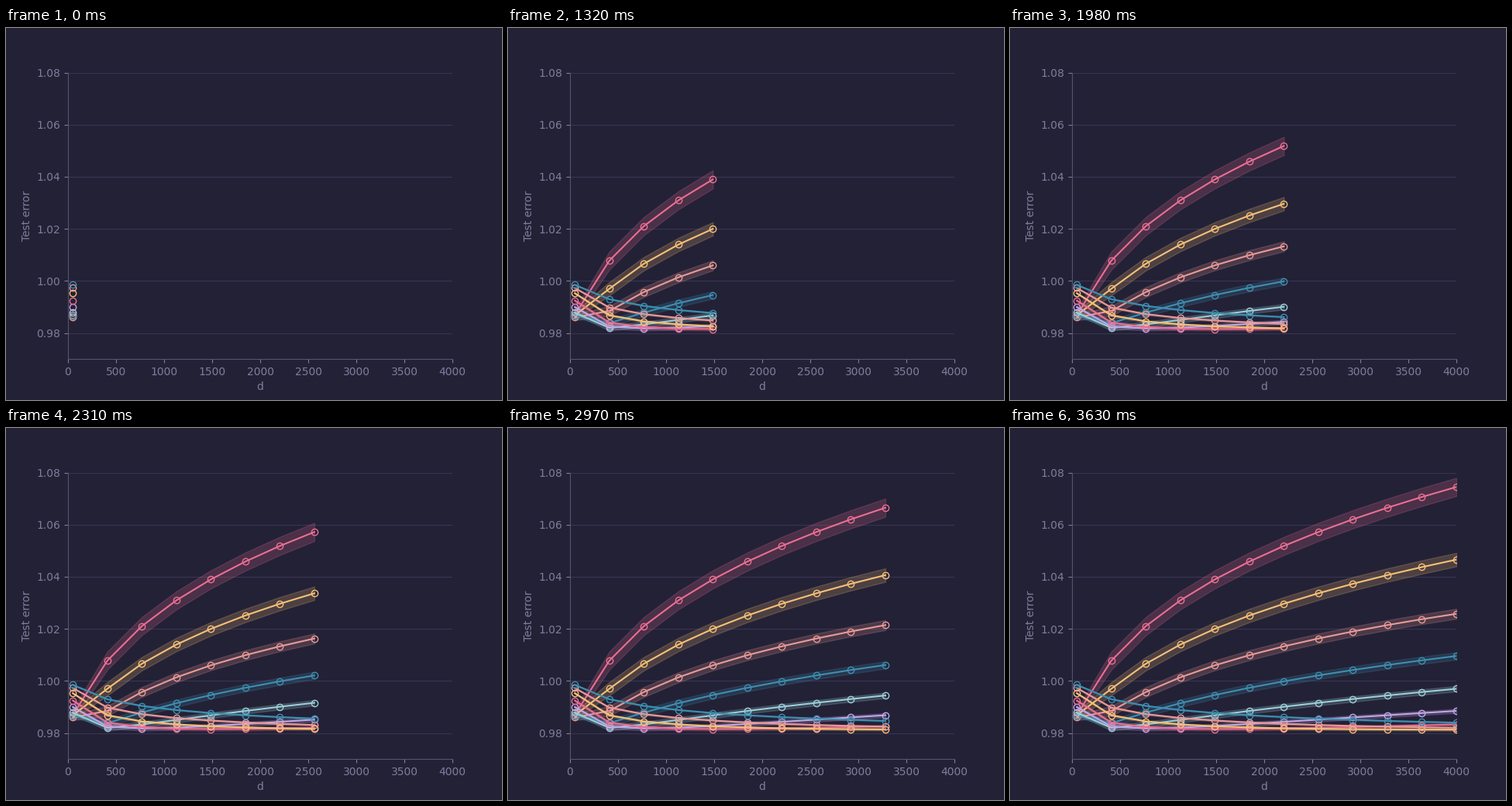
Write a matplotlib script that moves like this. It is 640 px wide and 480 px high and loops after 6960 ms.

```python
import numpy as np
import matplotlib.pyplot as plt
from matplotlib.animation import FuncAnimation

BASE, GRID, EDGE, TEXT = "#232136", "#393552", "#59546d", "#817c9c"
LOVE, GOLD, ROSE = "#eb6f92", "#f6c177", "#ea9a97"
PINE, FOAM, IRIS = "#3e8fb0", "#9ccfd8", "#c4a7e7"
PALETTE = [LOVE, GOLD, ROSE, PINE, FOAM, IRIS]

STEP_MS, LOOP_MS, TICK_MS = 330, 6960, 30
dims = np.linspace(50, 4000, 12)

# Each curve is a cubic in log(d) through four knots (1e-4 around 1)
knots = np.log(dims[[0, 1, 4, 11]])
MODELS = [
    (-130, 78, 390, 745), (-132, -30, 200, 466), (-140, -115, 60, 258),
    (-132, -162, -54, 96), (-122, -180, -132, -30), (-100, -175, -173, -115),
    (-75, -160, -185, -167), (-47, -132, -174, -187),
    (-27, -102, -152, -180), (-15, -70, -123, -160),
]


def curve(values):
    return 1 + 1e-4 * np.polyval(np.polyfit(knots, values, 3), np.log(dims))


def spread(i):
    """Half-width of the band: shrinks per model, narrow at small d."""
    return 35e-4 * 0.74 ** i * (1 - np.exp(-dims / 60))


def style_axes(ax):
    ax.set_facecolor(BASE)
    ax.set(xlim=(0, 4000), ylim=(0.97, 1.08))
    ax.set_xlabel("d", color=TEXT)
    ax.set_ylabel("Test error", color=TEXT)
    ax.set_xticks(range(0, 4001, 500))
    ax.set_yticks(np.arange(0.98, 1.081, 0.02))
    ax.yaxis.set_major_formatter("{x:.2f}")
    ax.tick_params(color=TEXT, labelcolor=TEXT)
    ax.grid(axis="y", color=GRID, linewidth=0.8)
    ax.set_axisbelow(True)
    for side, spine in ax.spines.items():
        spine.set_visible(side in ("left", "bottom"))
        spine.set_color(EDGE)


fig, ax = plt.subplots(figsize=(6.4, 4.8), dpi=100, facecolor=BASE)
fig.subplots_adjust(left=0.125, right=0.9, bottom=0.11, top=0.88)
style_axes(ax)

series = []
for i, values in enumerate(MODELS):
    color = PALETTE[i % len(PALETTE)]
    mean, half = curve(values), spread(i)
    line, = ax.plot([], [], color=color, lw=1.5, marker="o", ms=6,
                    mfc="none", mew=1)
    band = ax.fill_between(dims, mean - half, mean + half, color=color,
                           alpha=0.2)
    series.append((line, band, mean, half))


def update(frame):
    n = min(frame * TICK_MS // STEP_MS + 1, len(dims))
    x = dims[:n]
    for line, band, mean, half in series:
        line.set_data(x, mean[:n])
        low, top = (mean - half)[:n], (mean + half)[:n]
        outline = np.column_stack([np.r_[x, x[::-1]], np.r_[low, top[::-1]]])
        band.set_verts([outline] if n > 1 else [])


anim = FuncAnimation(fig, update, frames=LOOP_MS // TICK_MS,
                     interval=TICK_MS, repeat=True, repeat_delay=0)
plt.show()
```
